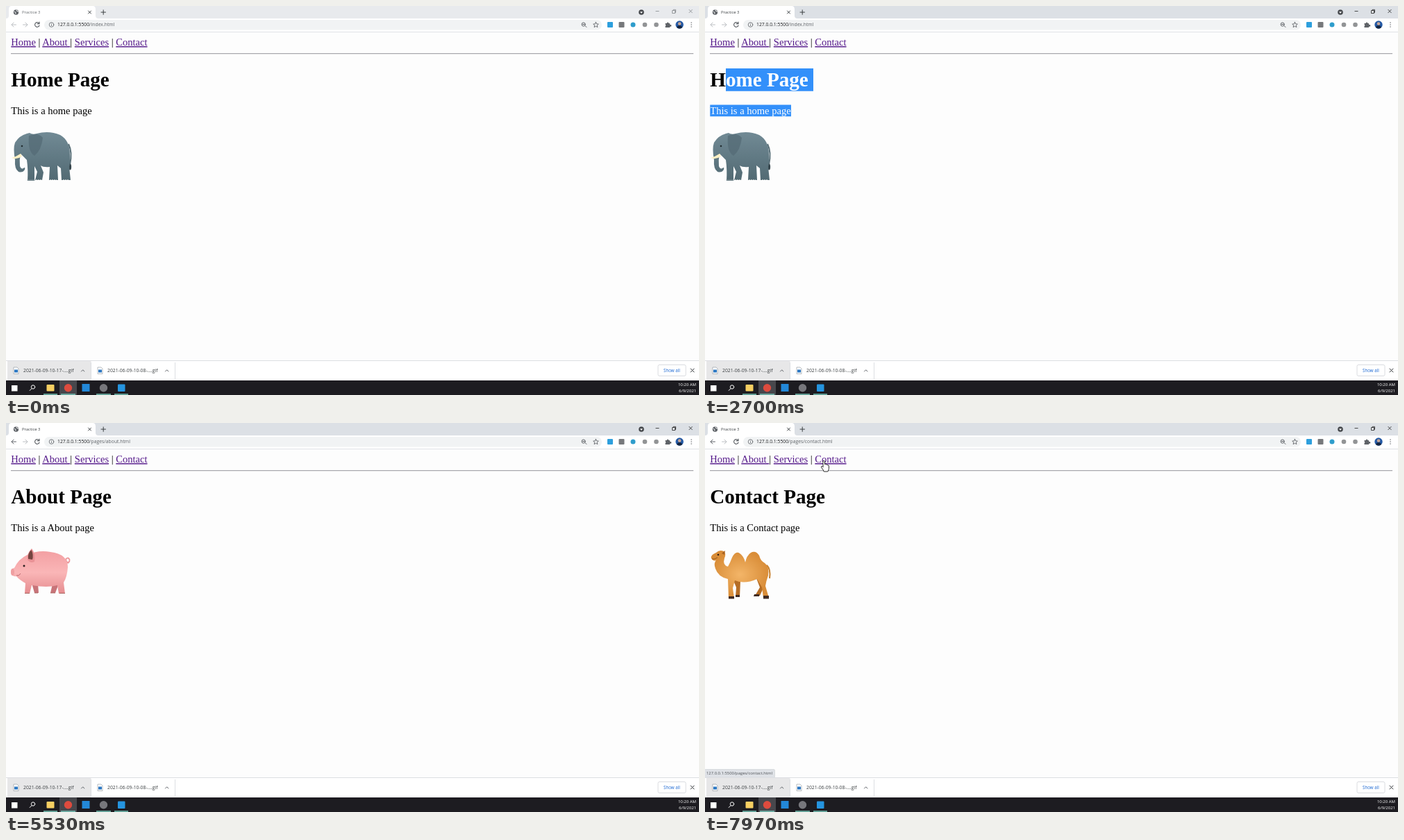
These frames come from a looping animation (998x561 px, 8000 ms). An HTML page:

```html
<!DOCTYPE html>
<html lang="en">
<head>
<meta charset="utf-8">
<title>Practice 3</title>
<style>
html, body { margin: 0; width: 100%; height: 100%; overflow: hidden; background: #fdfdfd; }
svg { display: block; width: 998px; height: 561px; }
text { white-space: pre; font-family: "Open Sans", "Noto Sans", sans-serif; font-size: 6.8px; fill: #3c4043; }
.page text { font: 14.56px "Liberation Serif", "Times New Roman", serif; fill: #000; }
.page .h1 { font-size: 29.12px; font-weight: bold; }
.page .sel text { fill: #fff; }
.link { fill: #551a8b; text-decoration: underline; }
.line { fill: none; stroke: #5f6368; stroke-linecap: round; stroke-linejoin: round; }
.small { font-size: 5.9px; }
.clock { fill: #fff; text-anchor: end; font-size: 6px; }
</style>
</head>
<body>
<svg viewBox="0 0 998 561">
  <defs>
    <linearGradient id="grey" x2="0" y2="1"><stop stop-color="#718a95"/><stop offset="1" stop-color="#526a73"/></linearGradient>
    <linearGradient id="pink" x2="0" y2="1"><stop stop-color="#f3a0a3"/><stop offset=".5" stop-color="#fab6b7"/><stop offset="1" stop-color="#e58c8f"/></linearGradient>
    <linearGradient id="green" x2="0" y2="1"><stop stop-color="#75ab31"/><stop offset="1" stop-color="#4f9c36"/></linearGradient>
    <radialGradient id="shell" cy=".4"><stop stop-color="#7cdcae"/><stop offset="1" stop-color="#3fb184"/></radialGradient>
    <radialGradient id="sand"><stop stop-color="#f3b568"/><stop offset="1" stop-color="#d98d38"/></radialGradient>
    <clipPath id="selClip">
      <rect id="selHead" x="30" y="90" height="32.7"/>
      <rect id="selPara" x="7.3" y="142.5" height="16.7"/>
    </clipPath>
  </defs>

  <g class="page">
    <rect width="998" height="561" fill="#fdfdfd"/>
    <text x="7.3" y="57"><tspan class="link">Home</tspan> | <tspan class="link">About </tspan>| <tspan class="link">Services</tspan> | <tspan class="link">Contact</tspan></text>
    <path d="M7 68.5H990" stroke="#a5a5ab"/><path d="M7 69.5H990" stroke="#ececec"/>
    <text class="h1 head" x="7.3" y="116"></text>
    <text class="para" x="7.3" y="155.5"></text>
    <g class="sel" clip-path="url(#selClip)">
      <rect y="88" width="200" height="75" fill="#3390fa"/>
      <text class="h1 head" x="7.3" y="116"></text>
      <text class="para" x="7.3" y="155.5"></text>
    </g>
  </g>

  <g class="animal">
    <path d="M90 199Q96 211 92 229" fill="none" stroke="#566d76" stroke-width="2"/>
    <ellipse cx="92.3" cy="232" rx="1.8" ry="4.5" fill="#35454c"/>
    <path fill="url(#grey)" d="M34 183Q38 186 44 184Q62 179 78 186Q92 194 92 214Q93 224 91 232L93 251H80L79 234L74 230L75 251H62L63 232Q54 233 50 230L54 240L52 251H42L45 239L41 231L41 252H31Q32 236 30 222Q24 216 21 213Q19 222 20 231Q22 236 25 234Q28 231 27 236Q24 241 18 239Q12 235 13 222Q10 205 13 197Q19 187 30 184Z"/>
    <path fill="#546b75" d="M33 187Q46 182 53 190Q51 208 41 216Q31 210 33 187Z" opacity=".75"/>
    <path fill="#fff0c4" d="M21 213Q15 217 8 219Q15 222 23 217Z"/>
    <circle cx="23" cy="202" r="1.3" fill="#222c31"/>
    <path d="M32 251h8M43 250.500h8M63 250.500h10M82 250.500h9" stroke="#a9b4b5" stroke-dasharray="2 1"/>
  </g>

  <g class="animal">
    <path d="M86 202q6 0 5.500-5q-2-4-5-1q-1 4 4 6" fill="none" stroke="#ec989b" stroke-width="1.8"/>
    <path fill="#c87479" d="M37 231L41 245H47L46 232ZM64 245L67 232H76L71 245Z"/>
    <path fill="url(#pink)" d="M7 215Q7 210 12 209Q18 196 31 190Q46 183 64 186Q89 189 89 208Q88 222 83 230L85 246H76L74 234Q60 238 37 234L34 246H27L28 231Q19 226 15 221Q8 222 7 215Z"/>
    <path fill="#e99296" d="M31 197Q30 188 37 181Q43 189 41 200Q35 203 31 197Z"/>
    <path fill="#74443f" d="M32 196Q31 188 36.500 183Q40 190 38 197Z"/>
    <ellipse cx="9.500" cy="215" rx="2.500" ry="5" fill="#ef9fa1"/>
    <path d="M15 220Q19 221 21 217" fill="none" stroke="#b9686d"/>
    <circle cx="26" cy="206" r="1.500" fill="#2d2020"/>
    <path d="M27 245.500h7M41 245h5M64 245h7M77 245.500h8" stroke="#a9635f"/>
  </g>

  <g class="animal">
    <path fill="#3d7e27" d="M42 229L50 242H58L57 228ZM67 228L66 241H75L79 229Z"/>
    <path fill="url(#green)" d="M8 198Q9 191 18 191Q29 190 31 202Q32 213 39 220L84 225Q92 222 95 225Q95 229 88 231Q95 239 94 245H81Q78 237 73 232L50 233Q48 243 39 245H24Q25 238 32 234Q22 226 20 208Q9 206 8 198Z"/>
    <path fill="#c5c74a" d="M25 245Q25 239 32 238Q37 241 34 245ZM81 245Q79 238 86 238Q94 240 94 245Z" opacity=".75"/>
    <path fill="url(#shell)" d="M32 223Q36 194 61 193Q86 194 92 222Q79 229 62 230Q43 230 32 223Z"/>
    <path d="M48 198L43 211L50 223H70L78 210L71 197M43 211L35 214M78 210L89 213M50 223L47 228M70 223L74 228M48 198Q60 192 71 197" fill="none" stroke="#36a47a" stroke-width="1.3"/>
    <path d="M31 222Q45 233 63 232Q83 231 93 222" fill="none" stroke="#349a74" stroke-width="4"/>
    <path d="M33 221Q46 230 63 230Q81 229 91 221" fill="none" stroke="#6fd0a2"/>
    <circle cx="15" cy="197" r="1.700" fill="#24351b"/>
    <path d="M8 201Q13 204 18 202" fill="none" stroke="#41712a"/>
  </g>

  <g class="animal">
    <path d="M89 205Q95 211 93 224" fill="none" stroke="#c6802f" stroke-width="2"/>
    <path fill="#b56d25" d="M40 225L45 237L44 251H50L51 228ZM74 224L79 237L72 249H79L85 236L85 222Z"/>
    <path fill="url(#sand)" d="M9 195Q8 190 16 187Q21 182 27 185Q31 188 28 195Q25 205 33 207Q36 202 39 194Q44 184 50 188Q56 192 58 201Q60 191 66 187Q73 183 78 191Q80 199 86 202Q93 207 91 220Q88 228 87 235L92 252H84L82 237L75 225Q57 233 43 227L40 238L42 253H34L33 225Q19 222 15 210Q12 202 16 198Q12 200 9 195Z"/>
    <path fill="#3f2a22" d="M34 250H42V253.500H34ZM84 249H92V253.500H84ZM44 248H50V251H44ZM71 247H78V250H70Z"/>
    <path fill="#a86222" d="M24 188L29 184L28 190Z"/>
    <circle cx="19" cy="190" r="1.300" fill="#2c1c14"/>
    <path d="M10 196Q14 197 18 194" fill="none" stroke="#97591f"/>
  </g>

  <g id="tabs">
    <rect id="strip" width="998" height="18"/>
    <path d="M0 18Q4 18 4 14V5Q4 0 8 0H125Q129 0 129 5V14Q129 18 133 18Z" fill="#fff"/>
    <circle cx="14.500" cy="9" r="3.700" fill="#5f6368"/>
    <path d="M12 8q3 1 2 3M15 6q0 2 2.500 2" class="line" style="stroke:#fff"/>
    <text id="title" class="small" x="23" y="11">Practice 3</text>
    <path class="line" style="stroke:#3c4043" d="M118.500 7l4 4m0-4l-4 4M137 9h6.500M140.200 5.800v6.500"/>
    <circle cx="915" cy="9" r="3.800" fill="#46494d"/><path d="M913 8.300h4l-2 2.500z" fill="#fff"/>
    <path id="winButtons" fill="none" d="M935.500 7.500h5M959.500 6.500h4v4h-4zM961 6.500v-1.200h3.500v4h-1M983.500 5l5 5m0-5l-5 5" stroke-width=".8"/>
  </g>

  <rect y="18" width="998" height="19" fill="#fff"/>
  <path d="M0 37.500H998" stroke="#dfe1e5"/>
  <rect x="55" y="20" width="803" height="14.500" rx="7.200" fill="#f1f3f4"/>
  <path id="back" class="line" d="M14.500 27H8m3-3L8 27l3 3"/>
  <path class="line" style="stroke:#bcbfc3" d="M24.500 27H31m-3-3l3 3l-3 3"/>
  <path class="line" style="stroke-width:1.200" d="M47.500 25A3.300 3.300 0 1 0 48 28M48 23v2.700h-2.700"/>
  <circle class="line" cx="65.500" cy="27" r="3.300" style="stroke-width:.8"/><path class="line" d="M65.500 26.800v1.700M65.500 25v.1" style="stroke-width:.8"/>
  <text x="74" y="29.400" style="fill:#5f6368"><tspan fill="#202124">127.0.0.1:5500</tspan><tspan id="path"></tspan></text>
  <path class="line" d="M834 28.500l2 2M830.500 26.500h2.500"/><circle class="line" cx="831.700" cy="26.500" r="2.600"/>
  <path class="line" style="stroke-width:.9" d="M849.500 23.300l1.100 2.500l2.700.3l-2 1.800l.6 2.700l-2.400-1.400l-2.400 1.400l.6-2.700l-2-1.800l2.700-.3z"/>
  <rect x="866" y="23" width="8" height="8" rx="1" fill="#2e9fdd"/>
  <rect x="882.500" y="23" width="8" height="8" rx="1" fill="#77797c"/>
  <circle cx="903" cy="27" r="3.500" fill="#2f9dcc"/>
  <circle cx="920" cy="27" r="3.300" fill="#929496"/><circle cx="936.500" cy="27" r="3.300" fill="#929496"/>
  <path fill="#5f6368" d="M949.500 25h2a1.500 1.500 0 1 1 3 0h1.500v2a1.500 1.500 0 1 1 0 2.500v1.500h-6.500v-2a1.500 1.500 0 0 0 0-2.500z"/>
  <circle cx="970" cy="27" r="5.700" fill="#2359a5"/><path d="M966 31q1-3 4-3t4 3q-4 3-8 0" fill="#14243f"/><circle cx="970" cy="25.500" r="2.300" fill="#c6a595"/>
  <path d="M987 24v6.500" stroke="#5f6368" stroke-width="1.500" stroke-linecap="round" stroke-dasharray="0 3"/>

  <g id="status">
    <rect id="statusBox" x="-1" y="499.500" height="12" rx="1.500" fill="#dee1e6" stroke="#cdd0d4" stroke-width=".6"/>
    <text id="statusText" class="small" x="2" y="507.400" style="fill:#4d5156"></text>
  </g>

  <rect y="511" width="998" height="29" fill="#fff"/>
  <rect x="2" y="512" width="120.500" height="28" fill="#e7e7e8"/>
  <path d="M0 511.500H998M122.500 514V538M243.500 514V538" stroke="#dcdee2" fill="none"/>
  <g id="file">
    <path d="M11 521h5l2 2v7.500h-7z" fill="#fff" stroke="#8c9097" stroke-width=".6"/>
    <rect x="12" y="524.500" width="5" height="4" fill="#2c78c4"/>
    <path class="line" d="M108.500 527l2.200-2.200l2.200 2.200"/>
  </g>
  <use href="#file" x="121"/>
  <text x="25" y="528.200">2021-06-09-10-17-....gif</text>
  <text x="146" y="528.200">2021-06-09-10-08-....gif</text>
  <rect x="939" y="517.500" width="40" height="16" rx="2" fill="#fff" stroke="#dadce0"/>
  <text x="947" y="527.600" style="font-size:6.200px;fill:#1a67d2">Show all</text>
  <path class="line" d="M986 523l5 5m0-5l-5 5" style="stroke:#3c4043"/>

  <rect y="540" width="998" height="21" fill="#1d1c21"/>
  <rect id="active" y="540" width="25" height="21" fill="#47474c"/>
  <rect x="8" y="547" width="8.500" height="8.500" fill="#fff"/>
  <g class="line" style="stroke:#fff"><circle cx="39" cy="549.500" r="2.700"/><path d="M37 551.700l-2.800 2.800"/></g>
  <rect x="58.500" y="546" width="11" height="9.500" rx="1" fill="#f7cf62"/>
  <circle cx="89.500" cy="550.800" r="5.700" fill="#dd4b3e"/>
  <rect x="109.500" y="545" width="11" height="11" fill="#2388d8"/>
  <circle cx="140.500" cy="550.800" r="5.700" fill="#77777c"/>
  <rect x="161" y="545.500" width="10.500" height="10.500" rx="1" fill="#2594df"/>
  <path d="M54 560H74M79 560H100M130 560H151M156 560H176" stroke="#79c9bb" stroke-width="1.500"/>
  <text class="clock" x="994" y="548.300">10:20 AM</text>
  <text class="clock" x="994" y="557.300">6/9/2021</text>

  <path id="hand" fill="#fff" stroke="#111" stroke-width=".9" stroke-linejoin="round" d="M-3-7Q-1.700-9-.5-7V-2.500Q1-3.500 1.700-2Q3-2.700 3.700-1.200Q5.200-1.500 5.400.3V3.500Q5.200 5.500 3.800 8H-1.800Q-2.500 5.500-5.300 2.300Q-6 .2-4.200.4L-3 1.600Z"/>
</svg>
<script>
const DURATION = 8000;
const ACTIVATE = 2570;
const $ = id => document.getElementById(id);
const all = selector => [...document.querySelectorAll(selector)];
const clamp = v => Math.max(0, Math.min(1, v));
const ramp = (t, start, end) => clamp((t - start) / (end - start));

const pages = [
  { at: 0, head: "Home Page", para: "This is a home page", path: "/index.html" },
  { at: 4500, head: "About Page", para: "This is a About page", path: "/pages/about.html" },
  { at: 6350, head: "Services Page", para: "This is a Services page", path: "/pages/server.html" },
  { at: 7620, head: "Contact Page", para: "This is a Contact page", path: "/pages/contact.html" }
];
const hints = [
  { from: 4100, to: 4800, path: pages[1].path, width: 97 },
  { from: 6000, to: 7030, path: pages[2].path, width: 98 },
  { from: 7150, to: 9000, path: pages[3].path, width: 101.500 }
];
// Each run lists time, x, y; the hand shows only during a run.
const runs = [
  [[1050, 52, 63], [1270, 58, 68], [1600, 62, 66]],
  [[3850, 62, 66], [4100, 71, 62], [4900, 71, 62]],
  [[5850, 104, 64], [6100, 124, 61], [6650, 124, 61], [6970, 162, 60], [7250, 173, 62], [8000, 173, 62]]
];

function handAt(t) {
  const run = runs.find(r => t >= r[0][0] && t < r.at(-1)[0]);
  if (!run) return null;
  const i = run.findIndex(p => p[0] > t);
  const a = run[i - 1], b = run[i];
  const k = ramp(t, a[0], b[0]), ease = k * k * (3 - 2 * k);
  return [a[1] + (b[1] - a[1]) * ease, a[2] + (b[2] - a[2]) * ease];
}

function showPage(index) {
  const { head, para, path } = pages[index];
  all(".head").forEach(e => e.textContent = head);
  all(".para").forEach(e => e.textContent = para);
  all(".animal").forEach((e, i) => e.style.display = i === index ? "" : "none");
  $("path").textContent = path;
  $("back").style.stroke = index ? "#5f6368" : "#bcbfc3";
}

let shown = -1;
function draw(now) {
  const t = now % DURATION;
  const index = pages.findLastIndex(p => t >= p.at);
  if (index !== shown) showPage(shown = index);

  const focused = t >= ACTIVATE;
  $("strip").setAttribute("fill", focused ? "#dce0e5" : "#e8eaed");
  $("title").style.fill = focused ? "#3c4043" : "#686c70";
  $("winButtons").setAttribute("stroke", focused ? "#222" : "#85888c");
  $("active").setAttribute("x", t > 430 && !focused ? 128 : 77);

  const selecting = focused && t < 3250;
  $("selHead").setAttribute("width", selecting ? 126 * ramp(t, 2570, 2640) : 0);
  $("selPara").setAttribute("width", selecting ? 116.700 * ramp(t, 2640, 2700) : 0);

  const hint = hints.find(h => t >= h.from && t < h.to);
  $("status").style.opacity = hint ? Math.min(ramp(t, hint.from, hint.from + 200), 1 - ramp(t, hint.to - 200, hint.to)) : 0;
  if (hint) {
    $("statusText").textContent = "127.0.0.1:5500" + hint.path;
    $("statusBox").setAttribute("width", hint.width);
  }

  const hand = handAt(t);
  $("hand").style.display = hand ? "" : "none";
  if (hand) $("hand").setAttribute("transform", `translate(${hand})`);
}

const start = performance.now();
function tick() {
  draw(performance.now() - start);
  requestAnimationFrame(tick);
}
tick();
</script>
</body>
</html>
```
